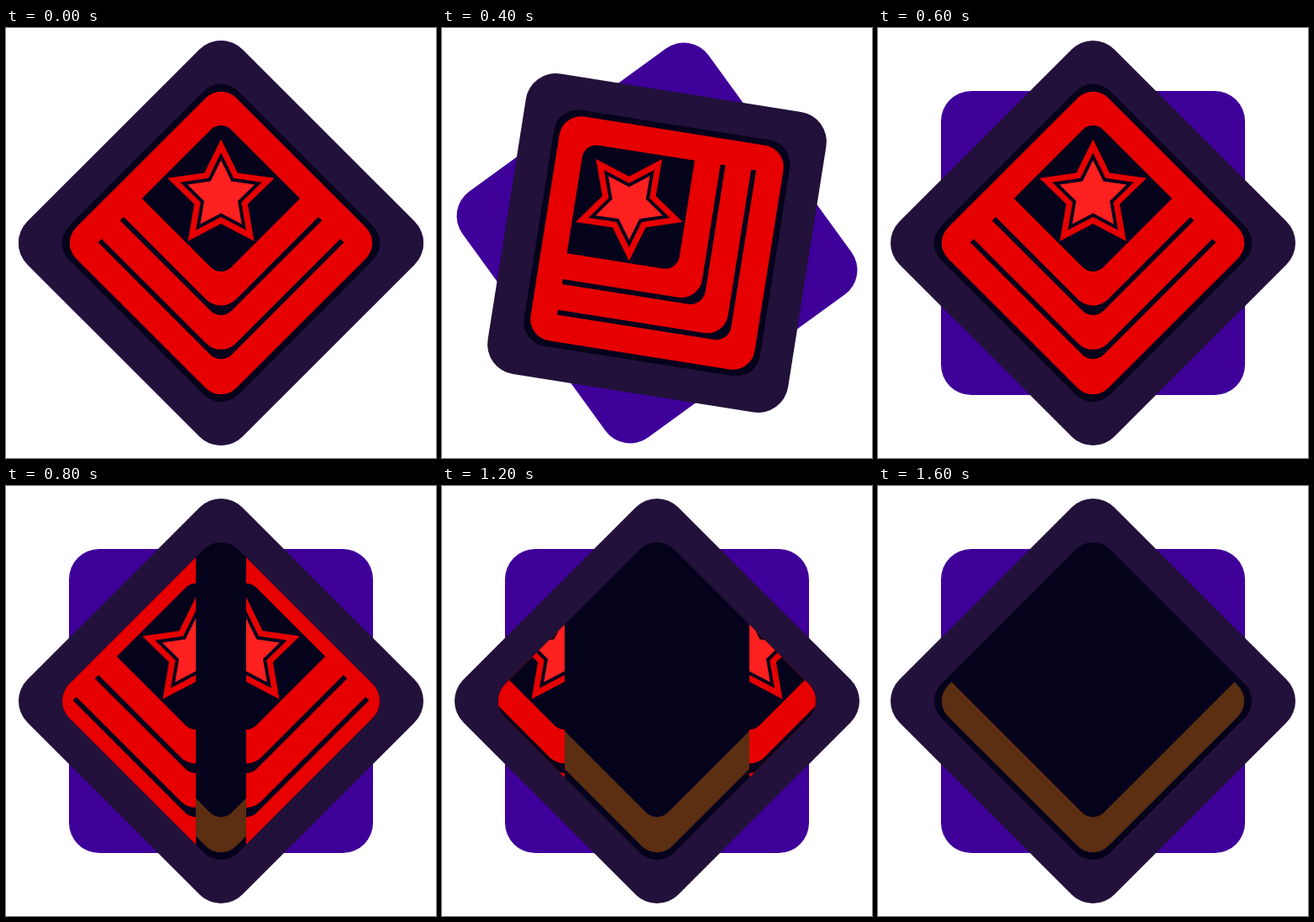
An HTML page with a canvas for the animation above (1650 ms loop, 512 px wide and 512 px high).

```html
<!DOCTYPE html>
<html lang="en">
<head>
<meta charset="utf-8">
<title>Sliding badge</title>
<style>
  html, body { margin: 0; width: 100%; height: 100%; overflow: hidden; background: #fff; }
  canvas { display: block; }
</style>
</head>
<body>
<canvas id="stage" width="512" height="512"></canvas>
<script>
const ctx = document.getElementById('stage').getContext('2d');
const STEP = 50, STEPS = 33;
const VIOLET = '#3f009a', PLUM = '#22113a', NIGHT = '#05021c';
const RED = '#e60000', BRIGHT = '#ff2020', BROWN = '#5c2e12';

const clamp = (v, lo, hi) => Math.min(hi, Math.max(lo, v));
const radians = deg => deg * Math.PI / 180;

function scoped(draw) {
  ctx.save();
  draw();
  ctx.restore();
}

// Square from (lo, lo) to (hi, hi), standing on its corner.
function diamondPath(lo, hi, radii) {
  ctx.rotate(Math.PI / 4);
  ctx.beginPath();
  ctx.roundRect(lo, lo, hi - lo, hi - lo, radii);
  ctx.rotate(-Math.PI / 4);
}

function diamond(lo, hi, radii, color) {
  diamondPath(lo, hi, radii);
  ctx.fillStyle = color;
  ctx.fill();
}

function star(radius, color) {
  ctx.beginPath();
  for (let k = 0; k < 10; k++) {
    const r = k % 2 ? radius / 2 : radius;
    const angle = k * Math.PI / 5;
    ctx.lineTo(r * Math.sin(angle), -56.5 - r * Math.cos(angle));
  }
  ctx.fillStyle = color;
  ctx.fill();
}

function emblem() {
  diamond(-142, 142, 28.5, NIGHT);
  diamond(-135, 135, 26, RED);
  for (const edge of [103, 66]) {
    diamond(-104, edge, [0, 0, 18, 0], NIGHT);
    diamond(-106, edge - 6, [0, 0, 25, 0], RED);
  }
  diamond(-104, 29, [17, 0, 17, 0], NIGHT);
  star(67, RED);
  star(51, NIGHT);
  star(42, BRIGHT);
}

function half(side, shift) {
  scoped(() => {
    ctx.translate(side * shift, 0);
    ctx.beginPath();
    ctx.rect(0, -256, side * 256, 512);
    ctx.clip();
    emblem();
  });
}

function front(gap) {
  diamond(-181, 181, 36, PLUM);
  diamond(-142, 142, 28.5, NIGHT);
  if (!gap) return emblem();
  diamond(-135, 135, 26, BROWN);
  diamond(-136, 103, [27, 0, 18, 0], NIGHT);
  diamondPath(-142, 142, 28.5);
  ctx.clip();
  half(-1, gap);
  half(1, gap);
}

function frame() {
  const step = Math.floor(performance.now() / STEP) % STEPS;
  const turnOut = 9 * clamp(step, 0, 5);
  const turnBack = 9 * clamp(step - 7, 0, 5);
  const gap = 10 * Math.max(0, step - 13);

  ctx.clearRect(0, 0, 512, 512);
  scoped(() => {
    ctx.translate(256, 256);
    scoped(() => {
      ctx.rotate(radians(turnBack));
      diamond(-181, 181, 36, VIOLET);
    });
    ctx.rotate(radians(turnBack - turnOut));
    front(gap);
  });
  requestAnimationFrame(frame);
}
frame();
</script>
</body>
</html>
```
